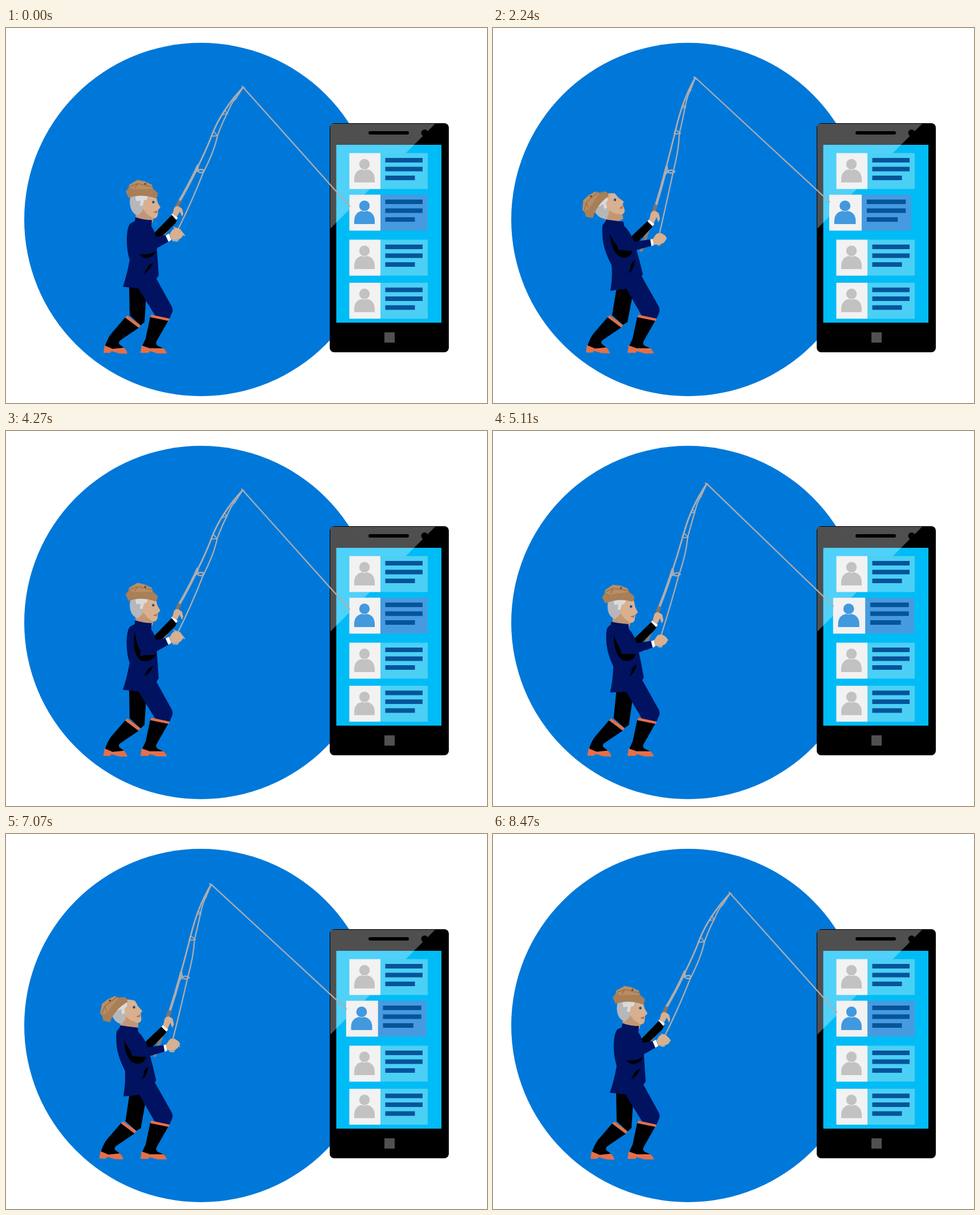
Recreate the animation shown at these times as an HTML page. Size 844 by 658 pixels, loop 8540 ms.

```html
<!DOCTYPE html>
<html lang="en">
<head>
<meta charset="utf-8">
<title>Angler and phone</title>
<style>
  html, body { margin: 0; width: 100%; height: 100%; overflow: hidden; background: #fff; }
  svg { display: block; width: 100vw; height: 100vh; }
  .card { --panel: #4ccff5; --person: #c2c2c2; }
  #hooked { --panel: #469be0; --person: #4299de; }
  .wire { fill: none; stroke: #adadaf; stroke-width: 2.3; stroke-linecap: round; stroke-linejoin: round; }
  .navy { fill: #001260; }
  .skin { fill: #d8b08f; }
  .white { fill: #fff; }
  .orange { fill: #e66f47; }
</style>
</head>
<body>
<svg viewBox="0 0 844 658" preserveAspectRatio="none">
  <defs>
    <clipPath id="body"><rect x="568" y="167" width="209" height="402" rx="8"/></clipPath>
    <g id="contact">
      <rect width="137.5" height="63" fill="var(--panel)"/>
      <rect width="54.5" height="63" fill="#f2f2f2"/>
      <path d="M8.500 51.500 V46 C8.500 34 16 28 26.500 28 S44.500 34 44.500 46 V51.500 Z" fill="var(--person)"/>
      <circle cx="26.500" cy="19.500" r="9.700" fill="var(--person)" stroke="#f2f2f2" stroke-width="1"/>
      <path d="M63 8.500 h65.500 v8 h-65.500 Z M63 24 h65.500 v8 h-65.500 Z M63 39.500 h52 v8 h-52 Z" fill="#06549a"/>
    </g>
  </defs>

  <circle cx="342" cy="336" r="310" fill="#0078d9"/>

  <!-- phone -->
  <g clip-path="url(#body)">
    <rect x="568" y="167" width="209" height="402"/>
    <rect x="579.500" y="205" width="184.500" height="312" fill="#00bcf6"/>
    <path d="M569 168 H753 L569 352 Z" fill="#fff" fill-opacity=".31"/>
  </g>
  <path d="M639 184 H704" stroke="#000" stroke-width="6" stroke-linecap="round"/>
  <circle cx="734.500" cy="184" r="6"/>
  <rect x="664" y="534" width="18" height="18" fill="#505050"/>
  <g class="card">
    <use href="#contact" x="602.500" y="219.500"/>
    <use href="#contact" x="602.500" y="371.500"/>
    <use href="#contact" x="602.500" y="447"/>
  </g>
  <g class="card" id="hooked"><use href="#contact"/></g>
  <path id="cast" class="wire"/>

  <!-- far leg -->
  <path d="M216 452 L217 504 L236 522 L243 516 L246 470 L242 452 Z"
    data-to="M217 455 L209 504 L228 521 L236 516 L244 474 L236 452 Z"/>
  <g id="step">
    <path d="M209 508 L233 526 L202 547 Q196 551 199 555 L207 561 L188 564 L174 558 Q177 547 184 537 Z"/>
    <path class="orange" d="M209 508 L213 504.500 L236 521.500 L233 526 Z M173 557 L187 563 L207 561 Q212 566 213 571.500 L199 571 L185 567 L183 570 L171 570 Z"/>
  </g>

  <!-- near leg -->
  <path class="navy" d="M229 452 L262 505 L287 510 L292 498 Q293 494 291 489 L264 440 L250 430 Z"
    data-to="M231 452 L261 505 L287 510 L292 498 Q293 494 291 489 L260 434 L245 426 Z"/>
  <path d="M253 507 L285 513 L264 550 Q262 555 267 558 L276 562 L258 564 L239 558 Q242 551 245 545 Z"/>
  <path class="orange" d="M255 503 L287 510 L285.500 514 L253.500 507.500 Z M238 557 L252 562 L276 562 Q281 566 282 571 L266 571 L252 567 L250 570 L236 570 Z"/>

  <!-- rod -->
  <path class="wire" style="stroke:#84807c;stroke-width:6" d="M299 320 L273 370" data-to="M283 322 L260 390"/>
  <path class="wire" style="stroke-width:4.500;stroke-linecap:butt" d="M303 306 Q324 270 337 241" data-to="M286 311 Q297 275 305 242"/>
  <path class="wire" style="stroke-width:2.800" d="M303 306 Q345 232 362 186 Q378 145 416 104" data-to="M286 311 Q303 250 320 181 Q332 127 355 87"/>
  <path class="wire" d="M301 355 Q326 305 346 254 Q366 215 371 189 Q380 165 388 150 Q396 130 403 124 L416 104"
    data-to="M292 361 Q305 305 316 253 Q326 215 327 185 Q333 160 337 139 Q341 118 346 110 L355 87"/>
  <path class="wire" d="M337 240 L330 255 L337 249 Z M336 251 Q342 246 348 250 Q343 257 336 251"
    data-to="M305 243 L301 259 L307 251 Z M306 252 Q312 247 319 252 Q312 257 306 252"/>
  <path class="wire" style="stroke-width:1.800" d="M364 181 L360 190 L371 189 Z M384 144 L380 152 L388 150 Z M400 121 L398 127 L403 125 Z M414 102 L419 106"
    data-to="M320 178 L318 186 L329 185 Z M333 134 L331 140 L338 139 Z M345 107 L342 111 L347 110 Z M352 86 L357 90"/>
  <path class="wire" style="stroke:#7d746c;stroke-width:6.500;stroke-linecap:butt" d="M297 320 L305 303" data-to="M281 326 L286 310"/>

  <!-- far arm -->
  <path d="M254 366 L291 328 L301 335 L297 343 L268 371 Z" data-to="M236 372 L272 338 L282 346 L277 352 L254 376 Z"/>
  <path class="white" d="M290 327 L293 325 L301.500 333 L299 337 Z" data-to="M271 339 L274 336 L283 344 L280 348 Z"/>
  <path class="skin" d="M292 327 L295 316 Q298 311 303 313 L309 317 L311 326 L309 331 L305 322 L300 331 Z"
    data-to="M274 337 L277 325 Q280 320 285 321 L291 325 L293 335 L290 341 L287 332 L282 343 Z"/>

  <!-- head -->
  <g id="head">
    <path fill="#c09777" d="M227 322 L260 330 L257 342 L228 342 Z"/>
    <path class="skin" d="M230 290 Q250 286 263 295 L266 306 L271 315 L267 319 L266 329 Q264 335 257 334 L240 330 L230 318 Z"/>
    <path fill="#c09777" d="M241 318 L247 326 L258 334 L246 337 L232 332 Z"/>
    <path fill="#b5b7ba" d="M219 293 Q215 308 220 319 Q224 327 232 329 L241 317 L237 306 L244 291 Z"/>
    <path fill="#d9dadc" d="M226 292 Q236 287 250 291 L247 301 L242 303 L240 312 L235 312 L236 303 L229 304 Z"/>
    <path d="M254 299 Q259 297 263 300" fill="none" stroke="#c8c1b9" stroke-width="2"/>
    <circle cx="258.500" cy="305.500" r="2.200" fill="#1c4e80"/>
    <path d="M258 323 L266 320 L264 325 Z" fill="#a9705a"/>
  </g>
  <g id="hat">
    <path fill="#b98e65" d="M215 284 L216 275 L231 266.500 L243 269 L256 275 L259 286 L238 292 Z"/>
    <path fill="#a87f56" d="M210 287 L216 279 L224 283 L258 282 L266 289 L266 295 L262 299 Q240 290 215 298 Z"/>
    <path d="M217 278 L231 273 L257 279 M231 273 L226 281" fill="none" stroke="#98704a" stroke-width="1.500"/>
    <circle cx="244.500" cy="273.500" r="1.600" fill="#4d3a28"/>
  </g>

  <!-- jacket -->
  <path class="navy" d="M227 332 Q241 337 256 337 L255 348 Q263 358 264 375 L266 405 L268 434 L264 440 L232 457 L205 454 Q212 434 217 407 Q211 388 212 366 Q213 349 218 343 L226 339 Z"
    data-to="M198 336 Q212 338 229 340 L230 347 Q241 358 247 373 L257 408 L263 432 L260 437 L232 458 L206 461 Q210 436 208 416 Q192 386 192 362 Q191 349 193 345 L197 340 Z"/>
  <path id="fold"/>
  <path d="M242 431 Q252 426 259 412 Q249 415 246 424 Z" data-to="M238 431 Q247 425 249 408 Q241 412 241 422 Z"/>

  <!-- near arm and reel -->
  <path class="navy" d="M236 370 L262 367 L280 363 L285 375 L262 388 Q248 394 236 395 Z"
    data-to="M214 372 L246 375 L276 371 L279 382 L250 390 Q236 391 220 389 Z"/>
  <path class="white" d="M280 364 L286 361 L290 372 L285 375 Z" data-to="M276 371 L281 370 L282 381 L278 383 Z"/>
  <g id="reel">
    <path d="M-10 -3 L-3 -11 L8 -9 L8 5 L2 13 L-7 12 Z" fill="#a9abae"/>
    <path class="wire" d="M-4 -12 L6 -8 L14 2"/>
  </g>
  <path class="skin" d="M287 362 L292 354 Q298 350 302 352 L308 357 L312 362 L307 369 L298 371 L290 371 Z"
    data-to="M280 371 L286 362 Q292 358 297 361 L302 364 L305 369 L300 377 L291 380 L282 380 Z"/>
</svg>
<script>
const LOOP = 8540, STEP = 70;

// time, lean, face tilt, hat tilt, card left shift, card right shift
const KEYS = [
  [0, 0, 0, 0, 0, 0],
  [210, .07, 0, -1, -.5, 0],
  [910, .84, -7, -24, -9, -5],
  [1120, .934, -11, -35, -11.5, -6.3],
  [1820, 1.08, -24, -53, -12.5, -6.5],
  [2240, 1, -26, -55, -12.5, -6.3],
  [2730, .58, -22, -45, -6, -2.5],
  [3220, .033, -12, -22, -1.3, 0],
  [3640, 0, -3, -6, 0, 0],
  [4200, 0, 0, 0, 0, 0],
  [4550, .2, 2, -1, -1, 0],
  [5110, .67, 3, -5, -5.8, -1],
  [5460, .97, 1, -12, -10, -5],
  [5950, 1.12, -6, -28, -12.5, -6.5],
  [6370, 1.1, -11, -42, -11, -6],
  [7070, .918, -14, -50, -5.7, -2],
  [7350, .85, -12, -45, -4.5, -1.5],
  [8190, .22, -3, -10, -1, 0],
  [8470, 0, 0, 0, 0, 0],
  [LOOP, 0, 0, 0, 0, 0]
];

const FOLD_SHORT = 'M235 397 C238 402 243 405 250 403 C256 401 262 397 264 391 C254 397 245 398 235 397';
const FOLD_LONG = 'M226 351 C222 375 226 404 243 404 C255 404 262 397 265 391 C238 398 232 388 226 351';
const FOLD_LEAN = 'M205 361 C206 385 217 404 230 403 C238 403 243 399 244 391 C228 391 220 391 205 361';

const $ = id => document.getElementById(id);
const set = (id, name, value) => $(id).setAttribute(name, value);
const lerp = (a, b, k) => a + (b - a) * k;
const NUM = /-?[\d.]+/g;

function mix(a, b, k) {
  const to = b.match(NUM);
  let i = 0;
  return a.replace(NUM, v => lerp(+v, +to[i++], k).toFixed(2));
}

const slope = (i, c) => KEYS[i] && KEYS[i + 1]
  ? (KEYS[i + 1][c] - KEYS[i][c]) / (KEYS[i + 1][0] - KEYS[i][0]) : 0;

// monotone tangent: no overshoot at the keys
function tangent(i, c) {
  const a = slope(i - 1, c), b = slope(i, c);
  return a * b > 0 ? 2 * a * b / (a + b) : 0;
}

function sample(t, c) {
  let i = 0;
  while (i < KEYS.length - 2 && t >= KEYS[i + 1][0]) i++;
  const p = KEYS[i], q = KEYS[i + 1], d = q[0] - p[0], u = (t - p[0]) / d, w = 1 - u;
  return p[c] * (1 + 2 * u) * w * w + q[c] * (3 - 2 * u) * u * u
    + d * u * w * (tangent(i, c) * w - tangent(i + 1, c) * u);
}

const morphs = [...document.querySelectorAll('[data-to]')]
  .map(el => ({ el, from: el.getAttribute('d'), to: el.dataset.to }));

function draw(t) {
  const [lean, face, hat, left, right] = [1, 2, 3, 4, 5].map(c => sample(t, c));
  for (const m of morphs) m.el.setAttribute('d', mix(m.from, m.to, lean));

  const open = Math.max(0, Math.min(1, t / 600, (8470 - t) / 600));
  set('fold', 'd', mix(mix(FOLD_SHORT, FOLD_LONG, open), FOLD_LEAN, lean));
  set('step', 'transform', `translate(${-8 * lean} ${-.5 * lean})`);

  const hx = -27 * lean + .5 * face, hy = 2.5 * lean;
  set('head', 'transform', `translate(${hx} ${hy}) rotate(${face} 242 312)`);
  set('hat', 'transform', `translate(${hx} ${hy - .09 * hat}) rotate(${hat} 242 312)`);

  const turn = Math.abs(Math.cos(28 * Math.PI * t / LOOP));
  set('reel', 'transform', `translate(${lerp(299, 292, lean)} ${lerp(362, 372, lean)}) scale(${turn} ${.6 + .4 * turn})`);

  const x = 602.5 + left;
  set('hooked', 'transform', `translate(${x} 292.5) scale(${(137.5 + right - left) / 137.5} 1)`);
  const endY = 313 - 8 * Math.min(1, -left / 8);
  set('cast', 'd', `M${lerp(416, 355, lean)} ${lerp(104, 87, lean)} L${x + .5} ${endY}`);
}

const start = performance.now();
function tick() {
  const t = (performance.now() - start) % LOOP;
  draw(Math.floor(t / STEP) * STEP);
  requestAnimationFrame(tick);
}
draw(0);
requestAnimationFrame(tick);
</script>
</body>
</html>
```
